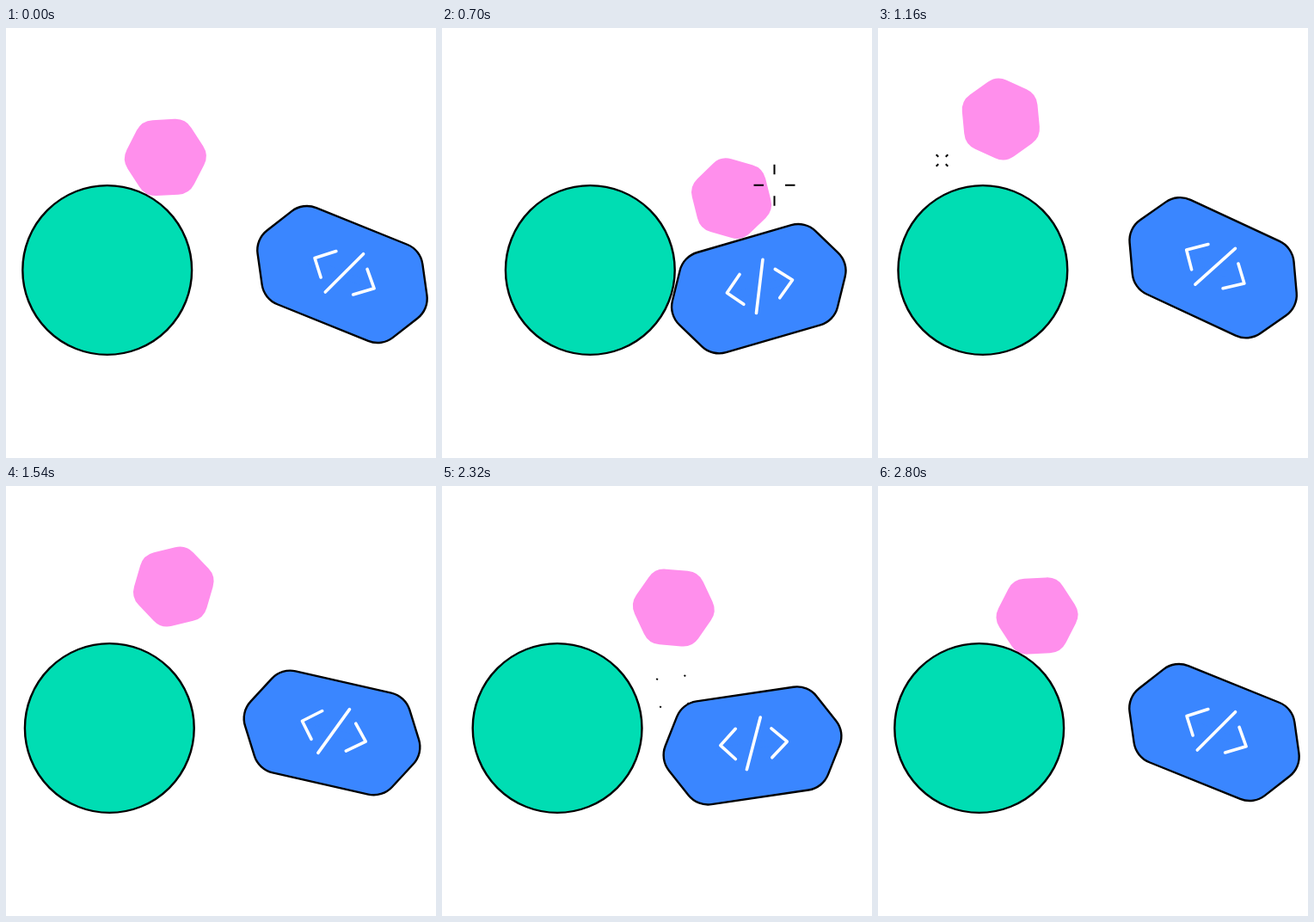
Animation, 500 px wide and 500 px high, one loop 2.82 s. Source, as an HTML page:

```html
<!DOCTYPE html>
<html lang="en">
<head>
<meta charset="utf-8">
<title>Bouncing shapes</title>
<style>
  html, body { margin: 0; width: 100%; height: 100%; overflow: hidden; background: #fff; }
  svg { display: block; width: 100vw; height: 100vh; stroke-linejoin: round; stroke-linecap: round; }
  #hexagon { fill: #ff8fec; stroke: #ff8fec; stroke-width: 44; }
  #ball { fill: #00ddb3; stroke: #000; stroke-width: 2.4; }
  .rim { fill: #000; stroke: #000; stroke-width: 60.4; }
  .face { fill: #3a86ff; stroke: #3a86ff; stroke-width: 55.6; }
  .code { fill: none; stroke: #fff; stroke-width: 3.6; }
  #sparks { fill: none; stroke: #000; stroke-width: 2; stroke-linecap: butt; }
</style>
</head>
<body>
<svg viewBox="0 0 500 500">
  <defs><path id="body" d="M-75.2 0L-57-31.5H57L75.2 0L57 31.5H-57Z"/></defs>
  <path id="hexagon" d="M0-25.4L22-12.7V12.7L0 25.4L-22 12.7V-12.7Z"/>
  <circle id="ball" cy="281.5" r="98.4"/>
  <path id="sparks"/>
  <g id="block">
    <use href="#body" class="rim"/>
    <use href="#body" class="face"/>
    <path class="code" d="M-16.7-22.3L-36.8-5.7L-21.8 12.5M13.9-31.2L-10.6 26.4M24.6-16.6L40.5 1.2L20.5 17"/>
  </g>
</svg>
<script>
const LOOP = 2820, SETTLED = 2800;
const HIT_1 = 700, HIT_2 = 2190;
const GRAVITY = 0.00143; // half the acceleration, px per ms squared
const [hexagon, ball, sparks, block] =
  ['hexagon', 'ball', 'sparks', 'block'].map(id => document.getElementById(id));

const clamp = v => Math.min(1, Math.max(0, v));
const mix = (a, b, u) => a + (b - a) * u;
const segment = (keys, t) => keys.findLastIndex((k, i) => i < keys.length - 1 && t >= k[0]);

// The ball speeds up towards each hit, then rolls back and slows down
function ballX(t) {
  const rest = 117.7;
  const [start, hit, end, reach] = t < 1400 ? [0, HIT_1, 1400, 54.8] : [1400, HIT_2, SETTLED, 29.3];
  return rest + reach * (t < hit
    ? ((t - start) / (hit - start)) ** 1.4
    : ((end - t) / (end - hit)) ** 2.4);
}

// Turning points of the block: time, x, y, angle
const home = [391, 286.5, 22];
const poses = [
  [0, ...home], [380, 378.7, 289, 3.6], [HIT_1, 368.3, 303.2, -16.2],
  [1140, 389.7, 278.7, 25], [HIT_2, 357, 304, -12.5], [SETTLED, ...home]
];

// Flat at turning points, smooth in between
function slope(keys, i, c) {
  if (i === 0 || i === keys.length - 1) return 0;
  const rate = k => (keys[k + 1][c] - keys[k][c]) / (keys[k + 1][0] - keys[k][0]);
  const a = rate(i - 1), b = rate(i);
  return a * b <= 0 ? 0 : 2 * a * b / (a + b);
}

function smooth(keys, t, c) {
  const i = segment(keys, t), a = keys[i], b = keys[i + 1];
  const d = b[0] - a[0], u = (t - a[0]) / d, v = 1 - u;
  return mix(a[c], b[c], u * u * (3 - 2 * u))
    + d * u * v * (v * slope(keys, i, c) - u * slope(keys, i + 1, c));
}

// Contacts of the hexagon: time, x, y, angle; it flies freely in between
const contacts = [
  [0, 185, 151, 27], [455, 340.5, 190.2, 78.5], [HIT_1, 337, 199, 106],
  [1220, 118, 138, 48], [1460, 170, 146, 65], [1875, 297, 196, 123],
  [HIT_2, 295.7, 218.4, 168], [2650, 203, 165, 122], [SETTLED, 185, 151, 87]
];

function flight(t) {
  const i = segment(contacts, t), a = contacts[i], b = contacts[i + 1];
  const u = (t - a[0]) / (b[0] - a[0]);
  const [x, y, angle] = [1, 2, 3].map(c => mix(a[c], b[c], u));
  return [x, y - GRAVITY * (t - a[0]) * (b[0] - t), angle];
}

const bursts = [
  { start: 580, x: 386.5, y: 182.7, turn: 0 },
  { start: 1138, x: 74.5, y: 154, turn: 45 },
  { start: 2094, x: 268.2, y: 238.7, turn: 38 }
];

function burst(t, { start, x, y, turn }) {
  const p = (t - start) / 240;
  if (p <= 0 || p >= 1) return '';
  const outer = mix(6, 24, clamp(p * 2.1));
  const inner = mix(6, 24, clamp((p - 0.2) / 0.84));
  return [0, 90, 180, 270].map(arm => {
    const a = (turn + arm) * Math.PI / 180;
    const at = r => `${x + r * Math.cos(a)} ${y + r * Math.sin(a)}`;
    return `M${at(inner)}L${at(outer)}`;
  }).join('');
}

function place(node, [x, y, angle]) {
  node.setAttribute('transform', `translate(${x} ${y}) rotate(${angle})`);
}

function draw(now) {
  const t = Math.min(now % LOOP, SETTLED);
  place(hexagon, flight(t));
  place(block, [1, 2, 3].map(c => smooth(poses, t, c)));
  ball.setAttribute('cx', ballX(t));
  sparks.setAttribute('d', bursts.map(b => burst(t, b)).join(''));
}

const begin = performance.now();
function tick() {
  draw(performance.now() - begin);
  requestAnimationFrame(tick);
}
tick();
</script>
</body>
</html>
```
